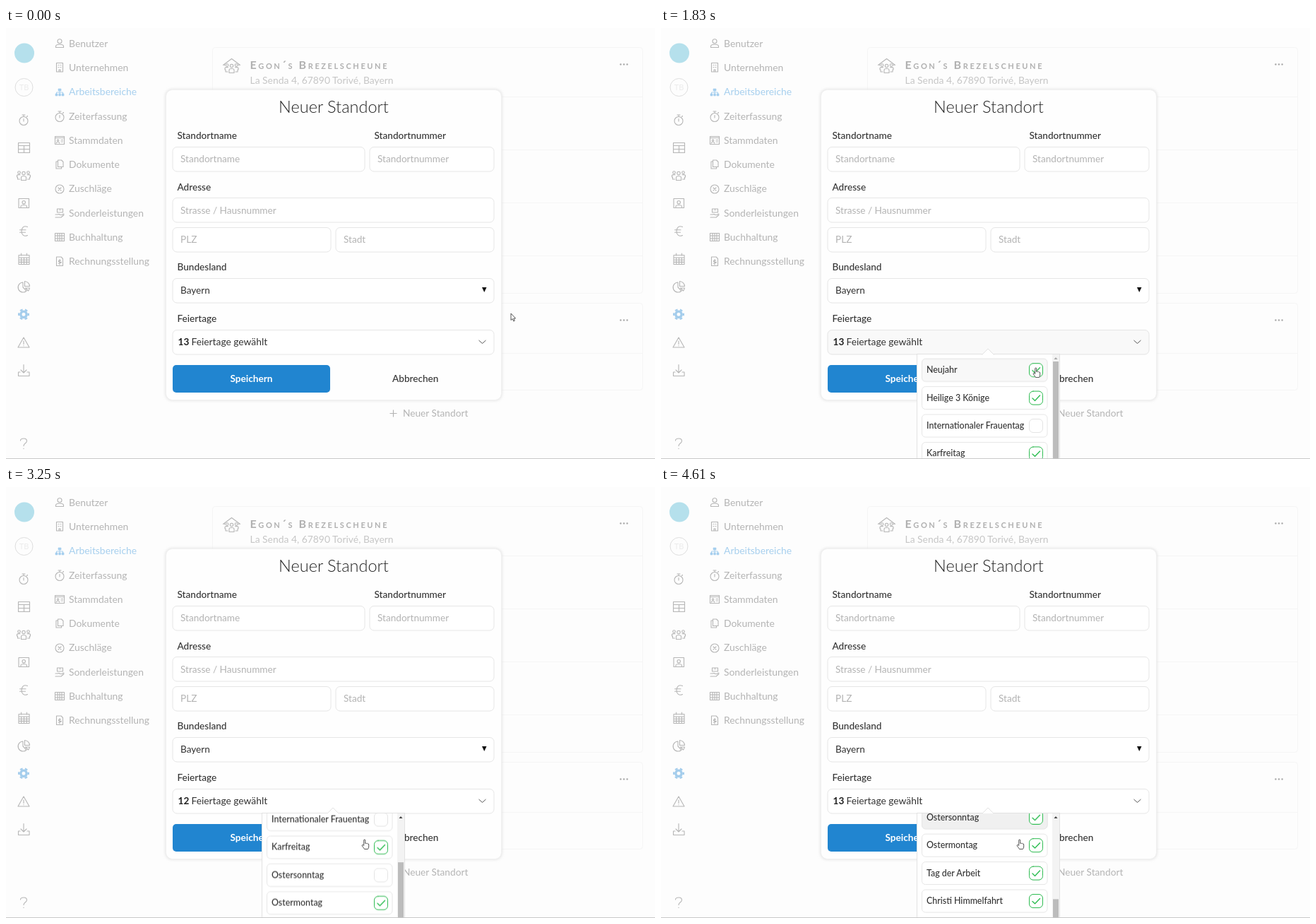
An HTML page for the animation above (4630 ms loop, 919 by 610 pixels).

```html
<!DOCTYPE html>
<html lang="de">
<head>
<meta charset="utf-8">
<title>Neuer Standort</title>
<style>
html, body { margin: 0; width: 100%; height: 100%; overflow: hidden; background: #fdfdfd; }
svg { display: block; width: 919px; height: 610px; font: 13.9px Lato, "Open Sans", sans-serif; }
text { white-space: pre; }

.icons { fill: none; stroke: #b6b6b6; stroke-width: 1.1; stroke-linecap: round; stroke-linejoin: round; }
.menu { fill: #b4b4b4; }
.menu .on { fill: #a6cfee; }
.card { fill: none; stroke: #f5f5f5; }
.name { font-size: 16px; font-weight: 700; font-variant: small-caps; letter-spacing: 2.6px; fill: #b0b0b0; }
.field { fill: #fff; stroke: #e6e6e6; }
.form { font-size: 13.6px; fill: #333; }
.form .label { font-weight: 500; }
.form .hint { fill: #b3b3b3; }
.mid { text-anchor: middle; }
.list text { font-size: 12.4px; font-weight: 500; fill: #333; }
.hover { fill: #f0f0f0; stroke: #e6e6e6; opacity: 0; }
.tick { fill: #fff; stroke: #2dbd51; stroke-linecap: round; stroke-linejoin: round; }

.run { animation: 4630ms linear infinite both; }
.move { animation-name: move; }
.arrow { animation-name: arrow; animation-timing-function: step-end; }
.hand { animation-name: hand; animation-timing-function: step-end; }
.press { animation-name: press; }
.panel { animation-name: open; }
.scroll { --k: -1px; animation-name: scroll; }
.thumb { --k: .64px; }
.up { animation-name: up; }
.n13 { animation-name: n13; animation-timing-function: step-end; }
.n12 { animation-name: n12; animation-timing-function: step-end; }
.hover0 { animation-name: hover0; }
.hover4 { animation-name: hover4; }
.tick0 { animation-name: tick0; }
.tick4 { animation-name: tick4; }

@keyframes move {
  0%, 8.21% { transform: translate(715px, 404px); }
  8.21% { animation-timing-function: ease-in-out; }
  17.71%, 33.91% { transform: translate(586px, 438px); }
  33.91% { animation-timing-function: ease-in-out; }
  41.9%, 100% { transform: translate(508px, 499px); }
}
@keyframes arrow { 0% { opacity: 1; } 13.9%, 100% { opacity: 0; } }
@keyframes hand { 0% { opacity: 0; } 13.9%, 100% { opacity: 1; } }
@keyframes press {
  0%, 13.9% { opacity: 0; }
  17%, 20.3% { opacity: .85; }
  20.8%, 37.3% { opacity: 1; }
  41%, 100% { opacity: 0; }
}
@keyframes open {
  0%, 24.19% { opacity: 0; animation-timing-function: ease; }
  28.73%, 100% { opacity: 1; }
}
@keyframes scroll {
  0%, 61.99% { transform: translateY(0); animation-timing-function: cubic-bezier(.35, 0, .75, .75); }
  67.17% { transform: translateY(calc(var(--k) * 60.5)); }
  73.65% { transform: translateY(calc(var(--k) * 128.5)); animation-timing-function: cubic-bezier(.3, .6, .5, 1); }
  77.75%, 97.62% { transform: translateY(calc(var(--k) * 151)); }
  97.62% { animation-timing-function: cubic-bezier(.4, .1, .8, .8); }
  99.57%, 100% { transform: translateY(calc(var(--k) * 174)); }
}
@keyframes up { 0%, 62% { fill: #a8a8a8; } 62.6%, 100% { fill: #444; } }
@keyframes n13 { 0% { opacity: 1; } 54% { opacity: 0; } 90.5%, 100% { opacity: 1; } }
@keyframes n12 { 0% { opacity: 0; } 54% { opacity: 1; } 90.5%, 100% { opacity: 0; } }
@keyframes hover0 { 0%, 37.9% { opacity: 0; } 41.5%, 100% { opacity: 1; } }
@keyframes hover4 { 0%, 77.75% { opacity: 0; } 80.5%, 100% { opacity: 1; } }
@keyframes tick0 { 0%, 51.7% { opacity: 1; } 58.5%, 100% { opacity: 0; } }
@keyframes tick4 { 0%, 88.2% { opacity: 0; } 94.5%, 100% { opacity: 1; } }
</style>
</head>
<body>
<svg viewBox="0 0 919 610">
  <defs>
    <clipPath id="view"><rect x="363" y="462" width="191" height="148"/></clipPath>
    <filter id="soft" x="-10%" y="-10%" width="120%" height="120%"><feGaussianBlur stdDeviation="2"/></filter>
    <g id="people">
      <circle cy="-3.5" r="2.2"/><circle cx="-6.5" cy="-4.5" r="1.8"/><circle cx="6.5" cy="-4.5" r="1.8"/>
      <path d="M-3.5 6.5V2.5Q-3.5 .5 0 .5T3.5 2.5V6.5ZM-5.5 5H-8.5V2H-9.5V-.5Q-8.5-1.7-5-1.2M5.5 5H8.5V2H9.5V-.5Q8.5-1.7 5-1.2"/>
    </g>
    <g id="watch"><circle cy="1.5" r="6"/><path d="M-2-7H2M0-7V-4.5M0-1.5V2M4.5-4.5L5.5-5.5"/></g>
    <g id="dots"><circle cx="-4.6" r="1.2"/><circle r="1.2"/><circle cx="4.6" r="1.2"/></g>
  </defs>

  <g class="card">
    <rect x="292.5" y="27.5" width="609" height="348" rx="4"/>
    <path d="M292 97.5H901M292 172.5H901M292 247.5H901M292 322.5H901M265 460.5H901"/>
    <rect x="264.5" y="389.5" width="637" height="123" rx="4"/>
  </g>

  <circle cx="26" cy="35.5" r="14" fill="#b5e0ec"/>
  <circle cx="25.5" cy="84" r="12.5" fill="none" stroke="#dedede"/>
  <text class="mid" x="25.5" y="88" font-size="11" fill="#ececec">TB</text>

  <g class="icons">
    <use href="#watch" x="25" y="130"/>
    <path d="M17.5 162.5H33.5V176.5H17.5ZM17.5 166.5H33.5M17.5 171.5H33.5M25.5 166.5V176.5"/>
    <use href="#people" x="25" y="209"/>
    <path d="M18 241.5H32.5V254.5H18ZM21 254V252.5Q21 250.5 25.2 250.5T29.5 252.5V254"/><circle cx="25.2" cy="246.7" r="2.2"/>
    <path d="M30.5 281.5Q23-.5 23 287.5" stroke="none"/>
    <path d="M30.5 281.5C25 279 22 283 22 287.5S25 296 30.5 293.5M19.5 285.7H28M19.5 289.3H27.5"/>
    <path d="M18 321.5H33V334.5H18ZM18 325H33M18 328.2H33M18 331.4H33M21.7 325V334.5M25.5 325V334.5M29.3 325V334.5M21.5 319V322M29.5 319V322"/>
    <path d="M24 360A7 7 0 1 0 29 372L24 367ZM26.5 358.5A7.5 7.5 0 0 1 33.5 365.5H26.5ZM27.5 368H33.5A7 7 0 0 1 31.5 372Z"/>
    <path d="M25 438L33 452H17ZM25 443V447.5M25 449.6V449.8"/>
    <path d="M25 476.5V487.5M21 484L25 488L29 484M20 487H17.5V492.5H33V487H30"/>
    <path d="M20.5 584Q20.5 581 25 581T29.5 584.5C29.5 588 25 587.5 25 591.5M25 595V595.4"/>
  </g>
  <g fill="none" stroke="#a4cdec">
    <circle cx="25" cy="405.3" r="4.2" stroke-width="3.4"/>
    <circle cx="25" cy="405.3" r="6.8" stroke-width="2.4" stroke-dasharray="3.8 3.32" stroke-dashoffset="1.9"/>
  </g>

  <g class="icons">
    <circle cx="76" cy="18.7" r="3"/><path d="M70.5 27.5V26Q70.5 23.3 76 23.3T81.500 26V27.500Z"/>
    <path d="M71.500 49.500H80.500V62H71.500ZM74 52.500H75M77 52.500H78M74 55.500H75M77 55.500H78M75 62V59H77V62"/>
    <use href="#watch" x="76" y="125"/>
    <path d="M69.500 153.500H82.500V164.500H69.500ZM69.500 155.500H82.500M78 158.500H80.500M78 161H80.500M71.500 163Q71.500 161 73.500 161T75.500 163"/><circle cx="73.500" cy="159" r="1.200"/>
    <path d="M73.500 187H78.500L81 189.500V196.500H73.500ZM73.500 189H71V199H78.500V196.500"/>
    <circle cx="76" cy="228" r="6"/><path d="M74 226L78 230M78 226L74 230"/>
    <path d="M72.500 256H80.500V261H72.500ZM76.500 256V258M70 264H73Q75 263 77 264.500H79L82 263M70 268H78L82 264.500"/>
    <path d="M69.500 290.500H82.500V301.500H69.500ZM69.500 294H82.500M69.500 298H82.500M73 290.500V301.500M76 290.500V301.500M79 290.500V301.500"/>
    <path d="M71.500 324H78L80.500 326.500V336.500H71.500ZM77.500 329Q74.500 328 74.500 330T77.500 331.500T74.500 333.500M76 327.500V335"/>
  </g>
  <g fill="#a6cfee" stroke="#a6cfee">
    <path d="M74 86H78V89H74ZM70 93H73V96H70ZM74.700 93H77.400V96H74.700ZM79 93H82V96H79Z" stroke-width=".6"/>
    <path d="M76 89V93M71.500 93V91H80.500V93" fill="none"/>
  </g>
  <g class="menu" id="menu"></g>

  <g class="icons" stroke="#a8a8a8">
    <path d="M307.500 52.500L319.500 43.500L331.500 52.500M309.500 53V51M329.500 53V51"/>
    <use href="#people" x="319.500" y="57"/>
  </g>
  <text class="name" x="345.500" y="57.500">Egon´s Brezelscheune</text>
  <text x="345.500" y="79" fill="#c6c6c6">La Senda 4, 67890 Torivé, Bayern</text>
  <g fill="#aaa"><use href="#dots" x="875" y="51.500"/><use href="#dots" x="875" y="413.500"/></g>
  <path d="M543.500 545.500H553.500M548.500 540.500V550.500" stroke="#b4b4b4" stroke-width="1.200"/>
  <text x="562" y="550" fill="#b4b4b4" font-size="13.700">Neuer Standort</text>

  <rect x="226" y="87" width="476" height="440" rx="9" fill="#ddd" filter="url(#soft)"/>
  <rect x="226.500" y="87.500" width="475" height="439" rx="9" fill="#fefefe" stroke="#f1f1f1"/>
  <text class="mid" x="464" y="119.700" font-size="23.500" font-weight="300" fill="#222">Neuer Standort</text>

  <g class="field" id="fields"></g>
  <rect class="hover run press" x="236" y="427.500" width="455" height="34" rx="6"/>
  <g class="form">
    <g class="label">
      <text x="242.500" y="157">Standortname</text>
      <text x="521.500" y="157">Standortnummer</text>
      <text x="242.500" y="230">Adresse</text>
      <text x="242.500" y="343.300">Bundesland</text>
      <text x="242.500" y="416">Feiertage</text>
    </g>
    <g class="hint">
      <text x="247" y="190">Standortname</text>
      <text x="526" y="190">Standortnummer</text>
      <text x="247" y="262.500">Strasse / Hausnummer</text>
      <text x="247" y="303.800">PLZ</text>
      <text x="478" y="303.800">Stadt</text>
    </g>
    <text x="247" y="376.300">Bayern</text>
    <path d="M674 367H680.500L677.250 374Z" fill="#111"/>
    <g font-weight="700" fill="#222">
      <text class="run n13" x="243.500" y="448.500">13</text>
      <text class="run n12" x="243.500" y="448.500">12</text>
    </g>
    <text x="262.500" y="448.500" font-size="13.800">Feiertage gewählt</text>
    <path d="M669.500 442L674.500 446.500L679.500 442" fill="none" stroke="#555"/>
    <rect x="236" y="477" width="223" height="39" rx="5" fill="#2185d0"/>
    <text class="mid" x="347.500" y="501.300" font-weight="700" fill="#fff">Speichern</text>
    <text class="mid" x="579.700" y="501.300" font-weight="500">Abbrechen</text>
  </g>

  <g class="run panel">
    <rect x="362.500" y="461.500" width="202" height="160" fill="#fff" stroke="#e2e2e2"/>
    <path d="M454.500 462.500L463 454L471.500 462.500" fill="#fff" stroke="#e2e2e2"/>
    <path d="M456 462.500H470" stroke="#fff" stroke-width="2"/>
    <g clip-path="url(#view)"><g class="list run scroll" id="list"></g></g>
    <rect x="554" y="462" width="10" height="148" fill="#f3f3f3"/>
    <path class="run up" d="M556.500 469L559 466L561.500 469Z"/>
    <rect class="run scroll thumb" x="555" y="472" width="8" height="250" fill="#bcbcbc"/>
  </g>

  <rect y="609" width="919" height="1" fill="#c9c9c9"/>

  <g class="run move" fill="#fff" stroke="#444" stroke-linejoin="round">
    <path class="run arrow" d="M0 0V9.500L2.200 7.600L3.800 11L5.300 10.300L3.800 7H6.600Z" stroke-width=".9"/>
    <path class="run hand" d="M-1.300 8.500V1Q-1.300 0 -.3 0T.7 1V5.500Q1.700 4.600 2.600 5.600Q3.600 4.900 4.300 6Q5.700 5.700 5.700 7V10Q5.700 12 4.400 13.500H-.5Q-1.500 11.500-3.700 9Q-4.300 7.800-3.300 7.400Q-2.300 7.300-1.300 8.500Z" stroke-width=".9"/>
  </g>
</svg>
<script>
const put = (id, html) => document.getElementById(id).innerHTML = html;

const menu = ['Benutzer', 'Unternehmen', 'Arbeitsbereiche', 'Zeiterfassung', 'Stammdaten',
  'Dokumente', 'Zuschläge', 'Sonderleistungen', 'Buchhaltung', 'Rechnungsstellung'];
put('menu', menu.map((label, i) =>
  `<text x="89" y="${26.7 + i * 34.27}"${i === 2 ? ' class="on"' : ''}>${label}</text>`).join(''));

// x, y, width
const fields = [[236, 168, 272], [515, 168, 176], [236, 240.5, 455], [236, 282, 224],
  [467, 282, 224], [236, 354.5, 455], [236, 427, 455]];
put('fields', fields.map(([x, y, w]) =>
  `<rect x="${x}" y="${Math.floor(y) + .5}" width="${w}" height="34.5" rx="6"/>`).join(''));

const days = ['Neujahr', 'Heilige 3 Könige', 'Internationaler Frauentag', 'Karfreitag', 'Ostersonntag',
  'Ostermontag', 'Tag der Arbeit', 'Christi Himmelfahrt', 'Pfingstsonntag'];
const animated = [0, 4];
const unchecked = 2;
const row = (label, i) => {
  const live = animated.includes(i);
  const box = 'x="369.5" y="-16" width="177.500" height="32" rx="5"';
  const square = '<rect x="521.500" y="-9.500" width="19" height="19" rx="5.500"';
  const tick = `<g class="tick${live ? ' run tick' + i : ''}">${square}/>
    <path d="M526 .5L529.500 3.800L536.500 -3.500" fill="none" stroke-width="1.400"/></g>`;
  return `<g transform="translate(0 ${484.2 + i * 39.4})">
    <rect class="field" ${box}/>
    ${live ? `<rect class="hover run hover${i}" ${box}/>` : ''}
    <text x="376" y="4">${label}</text>
    ${square} fill="none" stroke="#e4e4e4"/>
    ${i === unchecked ? '' : tick}</g>`;
};
put('list', days.map(row).join(''));
</script>
</body>
</html>
```
